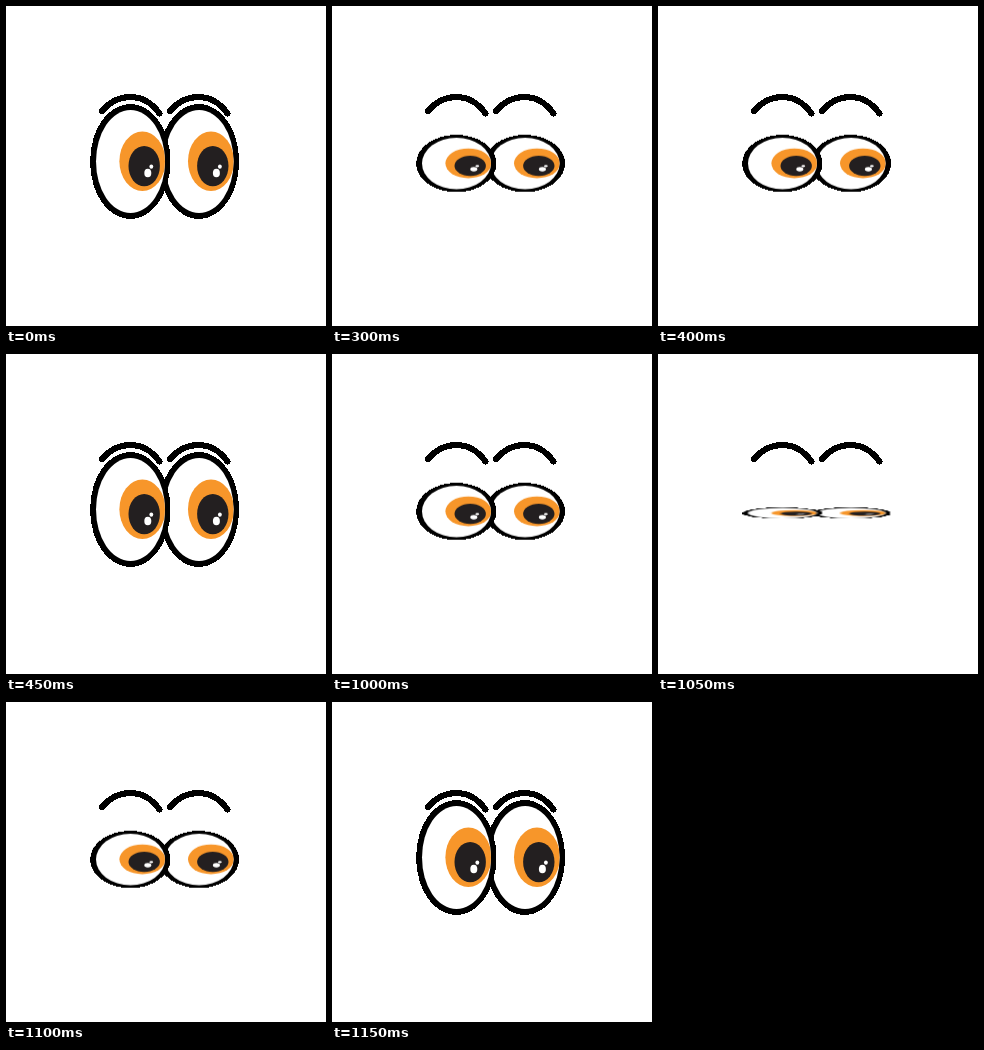
Animation, 320 px wide and 320 px high, one loop 1250 ms. Source, as an HTML page:

```html
<!DOCTYPE html>
<html lang="en">
<head>
<meta charset="utf-8">
<title>Blinking eyes</title>
<style>
  html, body { margin: 0; width: 100%; height: 100%; overflow: hidden; background: #fff; }
  svg { display: block; width: 100vw; height: 100vh; }
  .brow { fill: none; stroke: #000; stroke-width: 6; stroke-linecap: round; }
  .brow, .rim { shape-rendering: crispEdges; }
  .iris { fill: #f7962a; }
  .pupil { fill: #231f20; }
  .white { fill: #fff; }
  .eyes { transform-origin: 0 159.5px; animation: blink 1250ms step-end infinite; }
  /* Two blinks per loop: half, closed, half, open */
  @keyframes blink {
    0%, 36%, 92%, 100% { transform: scaleY(1); }
    24%, 32%, 80%, 88% { transform: scaleY(.5); }
    28%, 84% { transform: scaleY(.1); }
  }
</style>
</head>
<body>
<svg viewBox="0 0 320 320">
  <defs>
    <clipPath id="ball"><ellipse cx="124.5" cy="155.5" rx="34.5" ry="51.5"/></clipPath>
    <g id="eye">
      <ellipse class="rim" cx="124.3" cy="155.5" rx="40.2" ry="57.4"/>
      <ellipse class="white" cx="124.5" cy="155.5" rx="34.5" ry="51.5"/>
      <g clip-path="url(#ball)">
        <ellipse class="iris" cx="136.4" cy="155.2" rx="23" ry="29.8"/>
        <ellipse class="pupil" cx="138.2" cy="160.1" rx="15.7" ry="20.2"/>
        <ellipse class="white" cx="141.8" cy="167" rx="3.5" ry="4.3"/>
        <ellipse class="white" cx="145.3" cy="160.6" rx="1.9" ry="2.2"/>
      </g>
    </g>
    <path id="brow" class="brow" d="M96 105Q108 91 124 91Q142 91 153.5 107.5"/>
  </defs>
  <use href="#brow"/>
  <use href="#brow" x="68"/>
  <g class="eyes">
    <use href="#eye" x="68.6"/>
    <use href="#eye"/>
  </g>
</svg>
</body>
</html>
```
